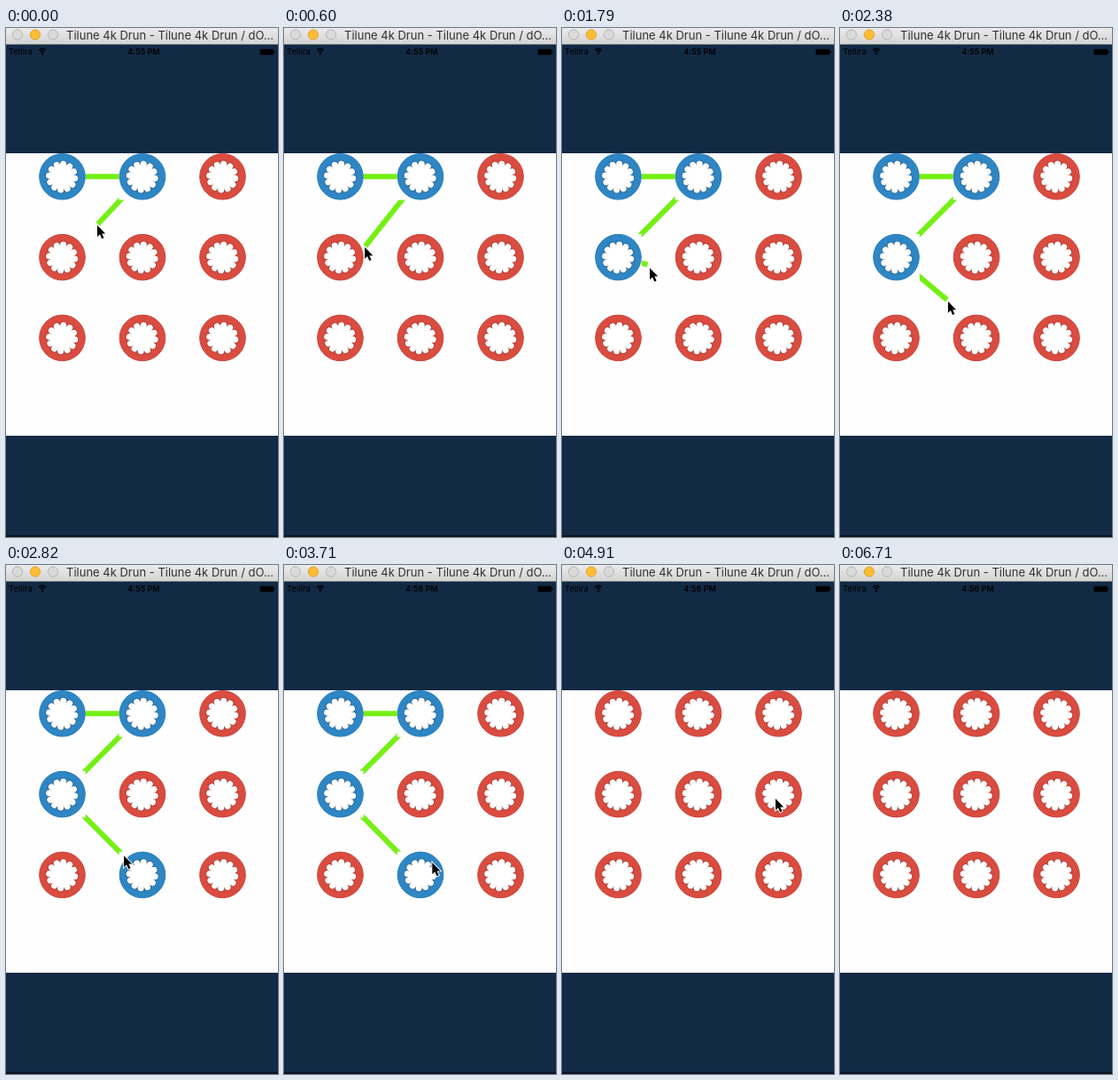
Write an HTML page that moves like this. It is 307 px wide and 573 px high and loops after 7.3 s.

```html
<!DOCTYPE html>
<html lang="en">
<head>
<meta charset="utf-8">
<title>Pattern lock</title>
<style>
html, body { margin: 0; width: 100%; height: 100%; overflow: hidden; background: #132a45; }
svg { display: block; width: 307px; height: 573px; font-family: Inter, Roboto, sans-serif; }
.petals { filter: drop-shadow(0 .5px .8px rgba(50, 30, 30, .45)); stroke-linecap: round; }
</style>
</head>
<body>
<svg viewBox="0 0 307 573">
  <defs>
    <linearGradient id="bar" x2="0" y2="1">
      <stop stop-color="#ebebeb"/><stop offset="1" stop-color="#d3d3d3"/>
    </linearGradient>
    <g id="flower"></g>
  </defs>

  <rect width="307" height="573" fill="#132a45"/>
  <rect y="571" width="307" height="2" fill="#0b1420"/>
  <rect width="307" height="18" fill="url(#bar)"/>
  <rect y="18" width="307" height="1" fill="#6f7883"/>
  <g fill="#dadada" stroke="#b4b4b4">
    <circle cx="13" cy="7.5" r="5.6"/>
    <circle cx="33" cy="7.5" r="5.6" fill="#fdbd33" stroke="#e0a02c"/>
    <circle cx="53" cy="7.5" r="5.6"/>
  </g>
  <text x="68" y="13" font-size="13" fill="#303030">Tilune 4k Drun - Tilune 4k Drun / dO...</text>

  <g>
    <text x="3" y="30" font-size="9.6">Tellira</text>
    <text id="clock" x="155.5" y="30" font-size="9" font-weight="600" text-anchor="middle"></text>
    <rect x="286.5" y="23.7" width="15.5" height="6.6" rx="1"/>
    <rect x="302.5" y="25.7" width="1" height="2.6"/>
    <circle cx="41" cy="29" r="1.2"/>
    <path d="M38.700 27q2.300-2 4.600 0M37 25q4-3.300 8 0" fill="none" stroke="#000" stroke-width="1.500"/>
  </g>

  <rect y="141" width="307" height="318" fill="#fefefe"/>
  <polyline id="line" fill="none" stroke="#74f012" stroke-width="6"/>
  <g id="nodes"></g>
  <path id="cursor" d="M0 0V13L3 10.200L5.200 15.200L7.500 14.200L5.300 9.400H9.200Z"
        stroke="#fff" stroke-width="1.800" paint-order="stroke"/>
</svg>
<script>
const LOOP = 7300, FRAME = 148.6, LAG = 30, RELEASE = 4910, GONE = 6710, MINUTE = 2970;
const HALF = 26.3;
const $ = id => document.getElementById(id);

const centers = Array.from({ length: 9 }, (_, i) =>
  [63.5 + i % 3 * 90.5, 167.3 + Math.floor(i / 3) * 90.8]);

// Pointer moves: start time, end time, destination
const origin = [106, 216];
const moves = [
  [-150, 0, 103, 222],
  [0, 600, 91, 247],
  [600, 1040, 86, 251],
  [1640, 1780, 99, 270],
  [1780, 2380, 122, 308],
  [2380, 2820, 133, 327],
  [2820, 3410, 152, 350],
  [3560, 4460, 241, 263],
  [6400, 6530, 265, 518]
];

const clamp = v => Math.min(1, Math.max(0, v));
const mix = (a, b, k) => a + (b - a) * k;
const pointer = t => moves.reduce(([px, py], [from, to, x, y]) => {
  const k = clamp((t - from) / (to - from));
  return [mix(px, x, k), mix(py, y, k)];
}, origin);

const ring = (r, w, color) => Array.from({ length: 12 }, (_, i) =>
  `<path d="M0 0V${-r}" stroke="${color}" stroke-width="${w}" transform="rotate(${i * 30 + 6})"/>`).join('');
$('flower').innerHTML =
  `<g class="petals">${ring(14, 7.2, '#dcd2d3')}${ring(14.8, 6.5, '#fff')}</g><circle r="11" fill="#fff"/>`;

$('nodes').innerHTML = centers.map(([x, y]) => `<g transform="translate(${x} ${y})">
  <rect x="${-HALF}" y="${-HALF}" width="${2 * HALF}" height="${2 * HALF}" fill="#fefefe"/>
  <circle class="disc" r="25.8"/><use href="#flower" x="-.3" y=".3"/></g>`).join('');
const discs = document.querySelectorAll('.disc');

// The line end trails the pointer and collects each node it enters
function trace(frame) {
  const path = [0, 1];
  let end;
  for (let n = 0; n <= frame; n++) {
    end = pointer(n * FRAME - LAG);
    const hit = centers.findIndex(c => c.every((v, k) => Math.abs(end[k] - v) < HALF));
    if (hit >= 0 && !path.includes(hit)) path.push(hit);
  }
  return { path, end };
}

function draw(t) {
  const frame = Math.floor((t + 9) / FRAME);
  const { path, end } = trace(frame);
  const held = t < RELEASE;
  $('line').setAttribute('points', held ? [...path.map(i => centers[i]), end].join(' ') : '');
  discs.forEach((disc, i) => {
    const on = held && path.includes(i);
    disc.setAttribute('fill', on ? '#2e86c4' : '#da4c40');
    disc.setAttribute('stroke', on ? '#2a7db9' : '#c9453b');
  });
  $('cursor').setAttribute('transform', `translate(${pointer(frame * FRAME)})`);
  $('cursor').setAttribute('visibility', t < GONE ? 'visible' : 'hidden');
  $('clock').textContent = t < MINUTE ? '4:55 PM' : '4:56 PM';
}

const start = performance.now();
function tick() {
  draw((performance.now() - start) % LOOP);
  requestAnimationFrame(tick);
}
tick();
</script>
</body>
</html>
```
